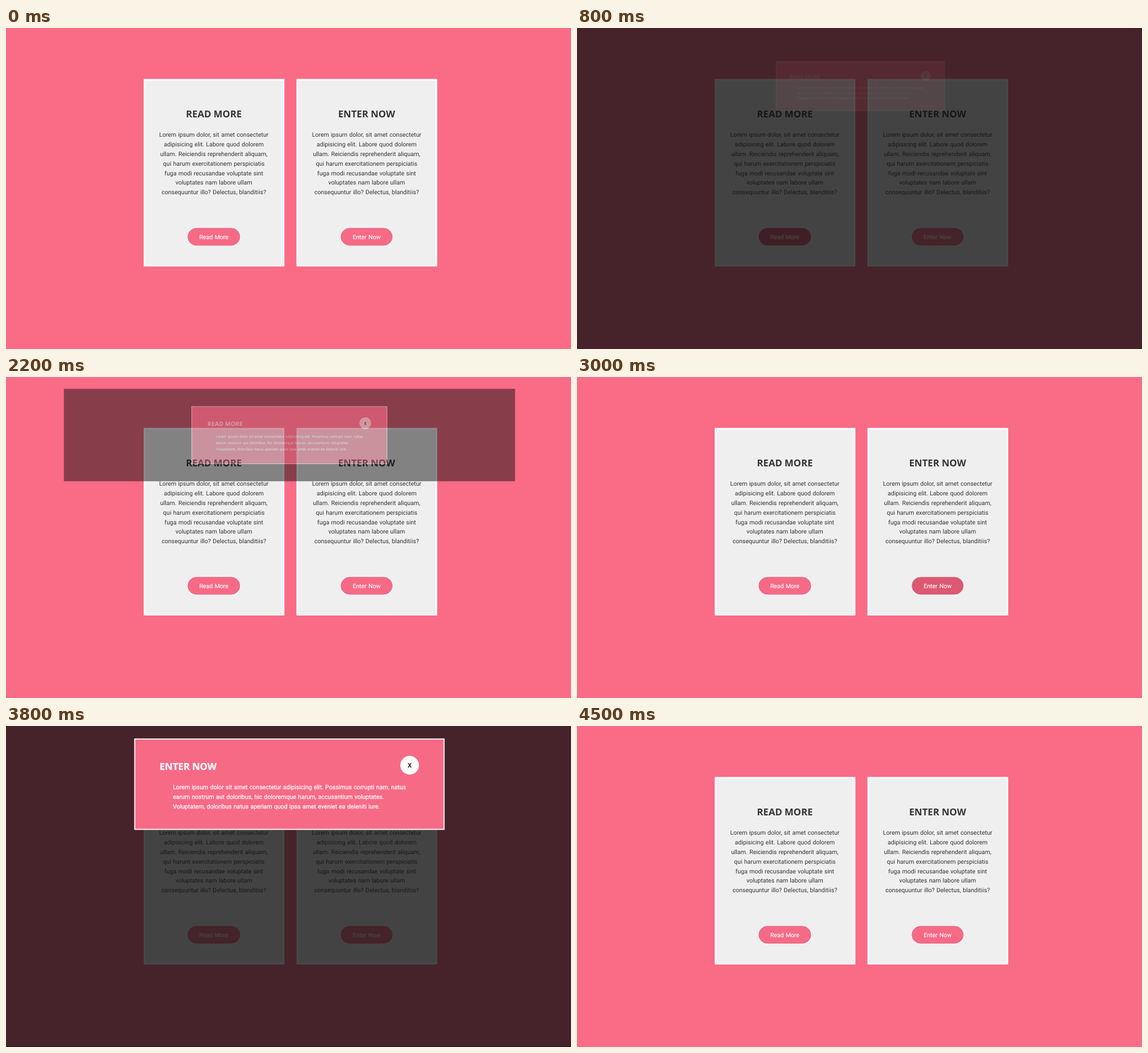
An HTML page that plays this animation: 993 px wide and 564 px high, repeating every 4.6 s.

```html
<!DOCTYPE html>
<html lang="en">
<head>
<meta charset="utf-8">
<title>Modal cards</title>
<style>
  html, body { margin: 0; width: 100%; height: 100%; overflow: hidden; background: #fa6b86; }
  svg { display: block; width: 993px; height: 564px; }
  text { font: 10.55px Roboto, "Noto Sans", sans-serif; word-spacing: .06em; text-rendering: geometricPrecision; }
  .title { font: bold 16.7px "Noto Sans", "Open Sans", sans-serif; word-spacing: 0; }
  .card text { text-anchor: middle; fill: #343434; }
  .card .label { fill: #fff; stroke: #fff; stroke-width: .15px; }
  .button { stroke: #c8637a; stroke-width: .7px; }
  .modal text { fill: #fff; stroke: #fff; stroke-width: .25px; }
  .modal .close { font-weight: bold; font-size: 11px; text-anchor: middle; fill: #222; stroke: none; }
</style>
</head>
<body>
<svg id="stage" viewBox="0 0 993 564"></svg>
<script>
const LOOP = 4600, STEP = 100;
const CENTER = { x: 498, y: 102 };
const CARD_TEXT = [
  'Lorem ipsum dolor, sit amet consectetur',
  'adipisicing elit. Labore quod dolorem',
  'ullam. Reiciendis reprehenderit aliquam,',
  'qui harum exercitationem perspiciatis',
  'fuga modi recusandae voluptate sint',
  'voluptates nam labore ullam',
  'consequuntur illo? Delectus, blanditiis?'
];
const MODAL_TEXT = [
  'Lorem ipsum dolor sit amet consectetur adipisicing elit. Possimus corrupti nam, natus',
  'earum nostrum aut doloribus, hic doloremque harum, accusantium voluptates.',
  'Voluptatem, doloribus natus aperiam quod ipsa amet eveniet ea deleniti iure.'
];
// Each visit: pointer enters the button, clicks it, later closes the modal.
const VISITS = [
  { title: 'READ MORE', hover: 380, click: 600, close: 2082 },
  { title: 'ENTER NOW', hover: 2880, click: 3100, close: 4180 }
];

const lines = (list, x, y) =>
  list.map((s, i) => `<text x="${x}" y="${y + i * 16.93}">${s}</text>`).join('');

const card = (x, title, label, buttonWidth) => {
  const mid = x + 123.3;
  return `<g class="card">
    <rect x="${x}" y="89.5" width="247.3" height="329.5" fill="#fff"/>
    <rect x="${x + 3}" y="92.5" width="241.3" height="323.5" fill="#efefef"/>
    <text class="title" x="${mid}" y="157.4">${title}</text>
    ${lines(CARD_TEXT, mid, 190.8)}
    <rect x="${mid - buttonWidth / 2 - .5}" y="351.8" width="${buttonWidth + 1}" height="31.4" rx="15.7" fill="#fff"/>
    <rect class="button" x="${mid - buttonWidth / 2}" y="351.8" width="${buttonWidth}" height="30.2" rx="15.1"/>
    <text class="label" x="${mid}" y="371">${label}</text>
  </g>`;
};

const stage = document.getElementById('stage');
stage.innerHTML = `
  <rect width="993" height="564" fill="#fa6b86"/>
  ${card(242, 'READ MORE', 'Read More', 91.4)}
  ${card(510.5, 'ENTER NOW', 'Enter Now', 90.2)}
  <g id="popup">
    <rect id="overlay" fill="#0e0e0e"/>
    <rect id="edge" y="562" width="993" height="2" fill="#000" opacity=".25"/>
    <g id="modal" class="modal">
      <rect x="226.3" y="22.8" width="543.6" height="158.8" fill="#f76a86" stroke="#fff" stroke-width="1.8"/>
      <text id="heading" class="title" x="270" y="77.2"></text>
      ${lines(MODAL_TEXT, 293.2, 110.7)}
      <circle cx="709.4" cy="69" r="16.4" fill="#fff"/>
      <text class="close" x="709.4" y="73">X</text>
    </g>
  </g>`;

const [popup, overlay, edge, modal, heading] =
  ['popup', 'overlay', 'edge', 'modal', 'heading'].map(id => document.getElementById(id));
const buttons = stage.querySelectorAll('.button');

const ramp = (t, start, length) => Math.min(1, Math.max(0, (t - start) / length));
const easeOut = p => 1 - (1 - p) ** 2;
const smooth = p => p * p * (3 - 2 * p);
const setAttrs = (el, attrs) => {
  for (const key in attrs) el.setAttribute(key, attrs[key]);
};
const mix = (a, b, p) => `rgb(${a.map((v, i) => Math.round(v + (b[i] - v) * p))})`;

function render(t) {
  const visit = VISITS[t < 2600 ? 0 : 1];
  const closing = t >= visit.close;
  const left = 1 - ramp(t, visit.close, 320);
  const shade = easeOut(ramp(t, visit.click, 210));
  const opened = smooth(ramp(t, visit.click + 120, 440));
  const scale = closing ? left : .5 + .5 * opened;

  // The overlay collapses to the container's box as soon as the modal closes.
  setAttrs(overlay, closing
    ? { x: 101.7, y: 20.8, width: 793, height: 162.4 }
    : { x: 0, y: 0, width: 993, height: 564 });
  overlay.setAttribute('opacity', .762 * shade);
  edge.setAttribute('visibility', !closing && shade === 1 ? 'visible' : 'hidden');

  // The popup fades as a whole while the modal inside it fades and shrinks.
  popup.setAttribute('opacity', left);
  heading.textContent = visit.title;
  setAttrs(modal, {
    opacity: opened * left,
    transform: `translate(${CENTER.x} ${CENTER.y}) scale(${scale}) translate(${-CENTER.x} ${-CENTER.y})`
  });

  VISITS.forEach(({ hover, click }, i) => {
    const dark = ramp(t, hover, 110) * (1 - ramp(t, click + 300, 100));
    buttons[i].setAttribute('fill', mix([247, 106, 134], [221, 88, 114], dark));
  });
}

const began = performance.now();
function tick() {
  const t = (performance.now() - began) % LOOP;
  render(Math.floor(t / STEP) * STEP);
  requestAnimationFrame(tick);
}
tick();
</script>
</body>
</html>
```
